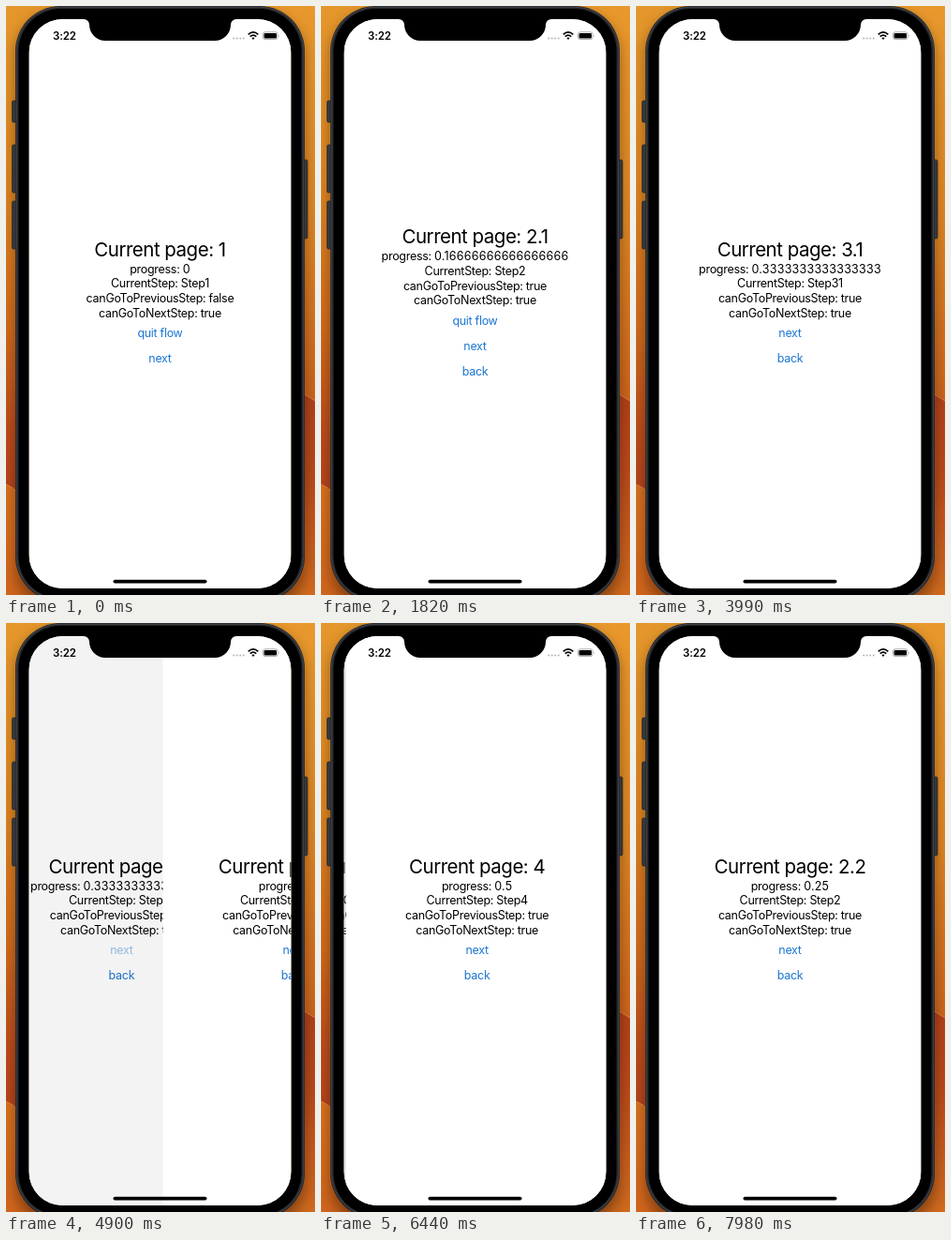
Write an HTML page that moves like this. It is 330 px wide and 628 px high and loops after 8 s.

```html
<!DOCTYPE html>
<html lang="en">
<head>
<meta charset="utf-8">
<title>Step flow</title>
<style>
  html, body { margin: 0; width: 100%; height: 100%; overflow: hidden; }
  svg { display: block; width: 100vw; height: 100vh; }
  text { font: 12.5px Inter, "Noto Sans", sans-serif; font-optical-sizing: none; letter-spacing: -.3px; }
  .page text { text-anchor: middle; }
  .page .title { font-size: 20.5px; letter-spacing: -.5px; }
  .page .number { letter-spacing: .22px; }
  .page .button { fill: #1d76d0; }
  .clock { font-size: 11.5px; font-weight: 600; letter-spacing: -.1px; }
</style>
</head>
<body>
<svg viewBox="0 0 330 628">
  <defs>
    <linearGradient id="left" x2="0" y2="1">
      <stop offset="0" stop-color="#e4972c"/>
      <stop offset=".3" stop-color="#dc8420"/>
      <stop offset=".55" stop-color="#cf6a1c"/>
      <stop offset=".72" stop-color="#bc4c1a"/>
      <stop offset=".82" stop-color="#b5431a"/>
    </linearGradient>
    <linearGradient id="right" x2="0" y2="1">
      <stop offset="0" stop-color="#e8982c"/>
      <stop offset=".35" stop-color="#dc8424"/>
      <stop offset=".66" stop-color="#cc641c"/>
    </linearGradient>
    <linearGradient id="lowLeft" x2="0" y2="1">
      <stop offset="0" stop-color="#d8701e"/>
      <stop offset="1" stop-color="#cf641c"/>
    </linearGradient>
    <linearGradient id="lowRight" x2="0" y2="1">
      <stop offset="0" stop-color="#b0401a"/>
      <stop offset=".4" stop-color="#b8491a"/>
      <stop offset="1" stop-color="#cf6a1e"/>
    </linearGradient>
    <filter id="blur" x="-20%" width="140%"><feGaussianBlur stdDeviation="7"/></filter>
    <clipPath id="screen"><rect x="24.5" y="14" width="280" height="607" rx="36"/></clipPath>
  </defs>

  <rect width="165" height="628" fill="url(#left)"/>
  <rect x="165" width="165" height="628" fill="url(#right)"/>
  <path d="M0 510Q8 513 14 520H165V628H0Z" fill="url(#lowLeft)"/>
  <path d="M330 421L314 411H165V628H330Z" fill="url(#lowRight)"/>
  <path d="M0 510Q8 513 14 520M330 421L314 411" fill="none" stroke="#e09048" stroke-width=".8"/>
  <rect x="10" y="6" width="309" height="640" rx="48" opacity=".35" filter="url(#blur)"/>

  <g fill="#34373b" stroke="#202225" stroke-width=".7">
    <rect x="6.5" y="101" width="5" height="23" rx="1.5"/>
    <rect x="6.5" y="148" width="5" height="51" rx="1.5"/>
    <rect x="6.5" y="208" width="5" height="51" rx="1.5"/>
    <rect x="317.5" y="164" width="4.5" height="84" rx="1.5"/>
  </g>
  <rect x="10" y="0" width="309" height="635" rx="48" fill="#24262a"/>
  <rect x="11.3" y="1.2" width="306.4" height="632" rx="46.7" fill="none" stroke="#44474b"/>
  <rect x="13.5" y="3" width="302" height="629" rx="45" fill="#000"/>

  <g clip-path="url(#screen)">
    <rect x="24.5" y="14" width="280" height="607" fill="#fff"/>
    <g id="pages"></g>
  </g>

  <path d="M83 13V14A6 6 0 0 1 89 20A17 17 0 0 0 106 37H223A17 17 0 0 0 240 20A6 6 0 0 1 246 14V13Z"/>
  <text class="clock" x="50" y="36">3:22</text>
  <g fill="#b4b4b4">
    <circle cx="243.2" cy="34.5" r="1"/><circle cx="246.7" cy="34.5" r="1"/>
    <circle cx="250.2" cy="34.5" r="1"/><circle cx="253.7" cy="34.5" r="1"/>
  </g>
  <g fill="none" stroke="#000" stroke-width="1.7">
    <path d="M258.7 30.3Q264 25.4 269.3 30.3M260.7 32.6Q264 29.6 267.3 32.6"/>
    <path d="M264 35.9L262.3 34.1Q264 32.8 265.7 34.1Z" fill="#000" stroke="none"/>
  </g>
  <rect x="274.5" y="27.8" width="15.6" height="7.8" rx="2.3" fill="none" stroke="#999" stroke-width=".8"/>
  <rect x="275.6" y="28.9" width="13.4" height="5.6" rx="1.3"/>
  <path d="M291 30.4Q292.2 31.7 291 33Z" fill="#999"/>
  <rect x="114.5" y="611.7" width="100" height="3.7" rx="1.85"/>
</svg>
<script>
const LOOP = 8000, TICK = 70, WIDTH = 280, CENTER = 164.5;
const PARALLAX = 0.3, DIM = 0.1, PRESSED = 0.22, RELEASE = 300;
const SPRING = Math.sqrt(1000 / 3) / 1000;
const SETTLED = 500;

// Listed from bottom to top of the navigation stack.
const pages = [
  ['1', '0', 'Step1', false, 'quit flow', 'next'],
  ['2.1', '0.16666666666666666', 'Step2', true, 'quit flow', 'next', 'back'],
  ['2.2', '0.16666666666666666', 'Step2', true, 'next', 'back'],
  ['3.1', '0.3333333333333333', 'Step31', true, 'next', 'back'],
  ['3.2', '0.5', 'Step32', true, 'next', 'back'],
  ['2.2', '0.25', 'Step2', true, 'next', 'back'],
  ['4', '0.5', 'Step4', true, 'next', 'back']
].map(buildPage);

const moves = [
  { from: 0, to: 1, press: 910, start: 1300 },
  { from: 1, to: 2, press: 2240, start: 2360 },
  { from: 2, to: 3, press: 3290, start: 3480 },
  { from: 3, to: 4, press: 4620, start: 4810 },
  { from: 4, to: 6, press: 5810, start: 6060 },
  { from: 6, to: 5, press: 6930, start: 7460 }
];

function add(parent, tag, attributes, content = '') {
  const node = document.createElementNS('http://www.w3.org/2000/svg', tag);
  for (const name in attributes) node.setAttribute(name, attributes[name]);
  node.textContent = content;
  parent.append(node);
  return node;
}

function buildPage([name, progress, step, hasPrevious, ...labels]) {
  const group = add(document.getElementById('pages'), 'g', { class: 'page' });
  const area = { x: CENTER - WIDTH / 2, y: 14, width: WIDTH, height: 607 };
  const shift = (2 - labels.length) * 13.3;
  const line = (y, content, type = '') =>
    add(group, 'text', { x: CENTER, y: y + shift, class: type }, content);

  add(group, 'rect', { ...area, fill: '#fff' });
  line(266.7, `Current page: ${name}`, 'title');
  add(line(284.5, 'progress: '), 'tspan', { class: 'number' }, progress);
  line(300.2, `CurrentStep: ${step}`);
  line(315.9, `canGoToPreviousStep: ${hasPrevious}`);
  line(331.6, 'canGoToNextStep: true');
  const buttons = {};
  labels.forEach((label, i) => buttons[label] = line(353 + i * 27, label, 'button'));
  const shade = add(group, 'rect', { ...area, opacity: 0 });
  return { group, buttons, shade };
}

function place(page, x, dim) {
  page.group.style.display = '';
  page.group.setAttribute('transform', `translate(${x} 0)`);
  page.shade.setAttribute('opacity', dim);
}

function remaining(elapsed) {
  const k = SPRING * elapsed;
  return elapsed >= SETTLED ? 0 : (1 + k) * Math.exp(-k);
}

function buttonOpacity(time, { press, start }) {
  if (time < press) return 1;
  const released = Math.max(0, time - start) / RELEASE;
  return Math.min(1, PRESSED + (1 - PRESSED) * released);
}

function draw(time) {
  for (const page of pages) page.group.style.display = 'none';
  for (const move of moves) {
    const label = move.to > move.from ? 'next' : 'back';
    pages[move.from].buttons[label].setAttribute('opacity', buttonOpacity(time, move));
  }

  const move = moves.filter(m => m.start <= time).pop();
  const rest = move ? remaining(time - move.start) : 0;
  if (!rest) return place(pages[move ? move.to : 0], 0, 0);

  const { from, to } = move;
  const cover = to > from ? 1 - rest : rest;
  place(pages[Math.min(from, to)], -PARALLAX * WIDTH * cover, DIM * cover);
  place(pages[Math.max(from, to)], WIDTH * (1 - cover), 0);
}

const began = performance.now();
function frame() {
  const time = (performance.now() - began) % LOOP;
  draw(Math.floor(time / TICK) * TICK);
  requestAnimationFrame(frame);
}
frame();
</script>
</body>
</html>
```
